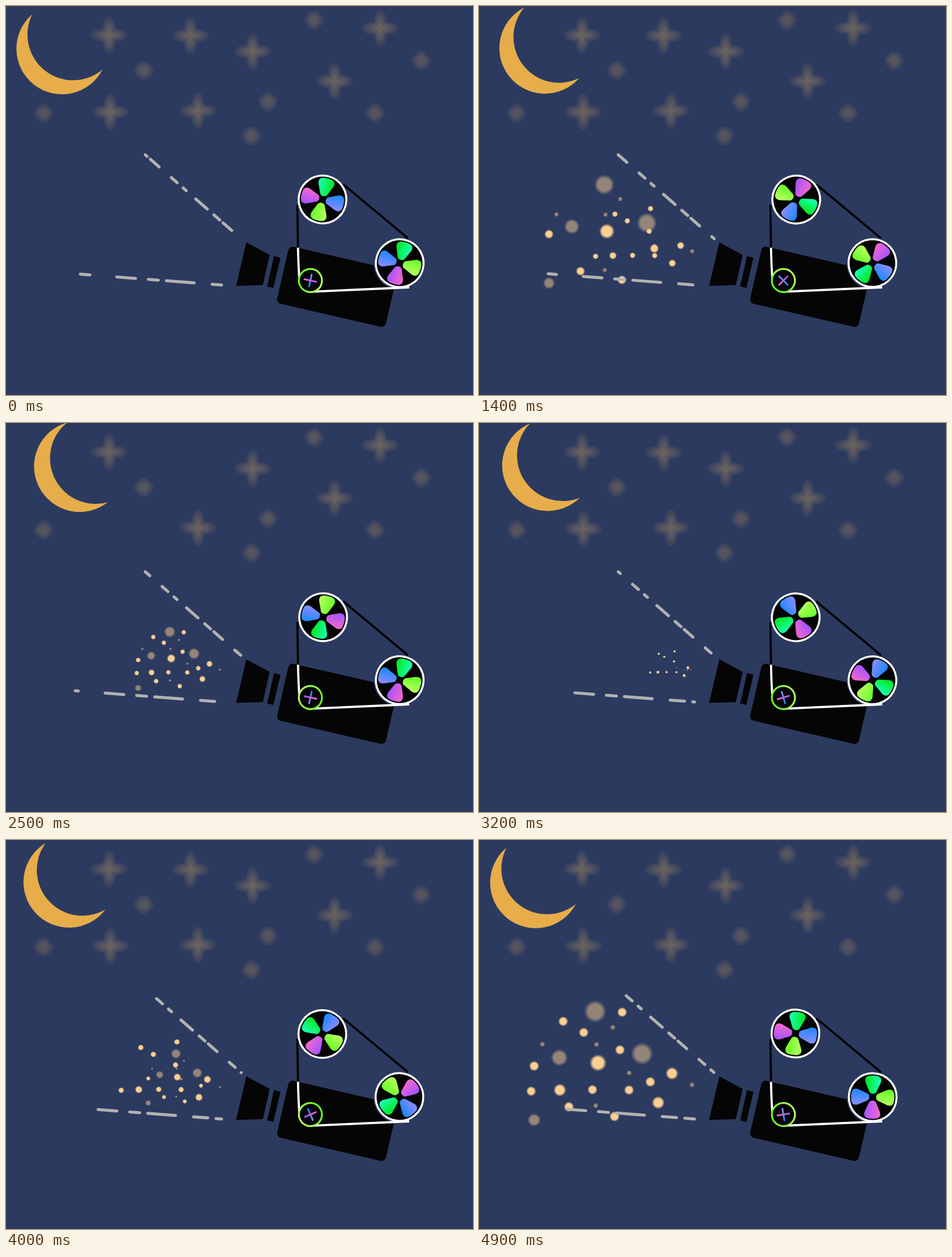
Recreate the animation shown at these times as an HTML page. Size 820 by 683 pixels, loop 5000 ms.

```html
<!DOCTYPE html>
<html lang="en">
<head>
<meta charset="utf-8">
<title>Night projector</title>
<style>
html, body { margin: 0; width: 100%; height: 100%; overflow: hidden; background: #2c3a60; }
svg { display: block; width: 820px; height: 683px; }
</style>
</head>
<body>
<svg viewBox="0 0 820 683" xmlns="http://www.w3.org/2000/svg">
  <defs>
    <linearGradient id="green"><stop stop-color="#1cffb8"/><stop offset="1" stop-color="#00e81c"/></linearGradient>
    <linearGradient id="blue"><stop stop-color="#1a88ff"/><stop offset="1" stop-color="#8c8cff"/></linearGradient>
    <linearGradient id="lime"><stop stop-color="#b8ff62"/><stop offset="1" stop-color="#66fc26"/></linearGradient>
    <linearGradient id="pink"><stop stop-color="#a452ff"/><stop offset="1" stop-color="#f268cc"/></linearGradient>
    <linearGradient id="rim" gradientUnits="userSpaceOnUse" x1="-20" x2="20"><stop stop-color="#66fc26"/><stop offset="1" stop-color="#b8ff62"/></linearGradient>
    <linearGradient id="barH" gradientUnits="userSpaceOnUse" x1="-11" x2="11"><stop stop-color="#f268cc"/><stop offset="1" stop-color="#a452ff"/></linearGradient>
    <linearGradient id="barV" gradientUnits="userSpaceOnUse" x1="0" x2="0" y1="-11" y2="11"><stop stop-color="#8c8cff"/><stop offset="1" stop-color="#1a88ff"/></linearGradient>
    <radialGradient id="glow">
      <stop offset=".62" stop-color="#fbd090"/>
      <stop offset="1" stop-color="#fbd090" stop-opacity="0"/>
    </radialGradient>
    <path id="petal" d="M-6.5-10Q-5-6 0-6Q5-6 6.5-10L13.5-26Q16-34 9-37Q0-39-9-37Q-16-34-13.5-26Z"/>
  </defs>
  <rect width="820" height="683" fill="#2c3a60"/>
  <g id="sky" fill="#e6ad5a" fill-opacity=".08"></g>
  <path id="moon" fill="#e6ad4a" d="M46 14.5A80 80 0 1 0 169.5 111.5A80.2 80.2 0 0 1 46 14.5Z"/>
  <g id="dots" fill="url(#glow)"></g>
  <g stroke="#b2b2b0" stroke-width="5.2" stroke-linecap="round">
    <path id="beamTop" d="M244.5 261.2L413 408.6" stroke-dasharray="20.4 28.5 13.8 14 7.1 22 27 15.5 13.8 7.5"/>
    <path id="beamLow" d="M121.5 470.2L378.5 489.8" stroke-dasharray="17 47.2 33.1 22.4 17.7 14.1 49.1 31.6 25.1 14.5"/>
  </g>
  <g fill="#050505">
    <path d="M422 415L463 437L451 490L404 491.5Z"/>
    <path d="M470.5 439L482 442L469.5 495L458.5 492.5Z"/>
    <rect width="196" height="102.6" rx="8" transform="translate(497.5 421) rotate(13)"/>
  </g>
  <circle cx="690.5" cy="452.5" r="44.8" fill="#2c3a60"/>
  <g fill="none" stroke-width="3.8">
    <path stroke="#050505" d="M511.6 349L512.7 424M592 313L706 408"/>
    <path stroke="#fff" d="M512.7 424.5Q513.4 455 515 478M536 501.7L708 494"/>
  </g>
  <g id="reels"></g>
  <g id="wheel" fill="none" stroke-width="3">
    <circle r="20.3" fill="#050505" stroke="url(#rim)" stroke-width="3.2"/>
    <path stroke="url(#barV)" stroke-linecap="round" d="M0-10.5V10.5"/>
    <path stroke="url(#barH)" stroke-linecap="round" d="M-10.5 0H10.5"/>
  </g>
</svg>
<script>
const LOOP = 5;
const byId = id => document.getElementById(id);

function add(parent, tag, attrs = {}) {
  const el = document.createElementNS("http://www.w3.org/2000/svg", tag);
  for (const key in attrs) el.setAttribute(key, attrs[key]);
  parent.appendChild(el);
  return el;
}

// Soft star outline: tip = reach of the arms, waist = reach of the diagonals
function outline(tip, waist) {
  const points = Array.from({ length: 64 }, (_, i) => {
    const a = i * Math.PI / 32;
    const r = waist + (tip - waist) * Math.cos(2 * a) ** 2;
    return `${(r * Math.cos(a)).toFixed(2)} ${(r * Math.sin(a)).toFixed(2)}`;
  });
  return `M${points.join("L")}Z`;
}

// The glow is a stack of shrinking outlines
const layers = (count, tip, step, waist) =>
  Array.from({ length: count }, (_, i) => outline(tip - i * step, (tip - i * step) * waist));
const BIG = layers(5, 32, 6.2, .54);
const SMALL = layers(3, 17, 4, .9);

function starGroup(big, small = []) {
  const g = add(byId("sky"), "g");
  const draw = shape => ([x, y]) => {
    const star = add(g, "g", { transform: `translate(${x} ${y})` });
    shape.forEach(d => add(star, "path", { d }));
  };
  big.forEach(draw(BIG));
  small.forEach(draw(SMALL));
  return g;
}
starGroup([[577, 132], [337, 184]]);
const starsA = starGroup(
  [[181, 51], [433, 80], [657, 39]],
  [[541, 25], [729, 96], [242, 113], [66, 188], [460, 168], [648, 188], [431, 228]]);
const starsB = starGroup([[324, 52], [183, 186]]);

// Speck kinds: radius and opacity
const KINDS = { t: [4, .5], s: [7.8, 1], m: [10, 1], l: [13, 1], M: [10, .5], L: [13, .5], X: [17, .5] };

// Spreads specks evenly along a curve that starts at a, bends toward b and ends at c
function trail(g, kinds, a, b, c) {
  [...kinds].forEach((kind, i) => {
    const u = i / (kinds.length - 1), v = 1 - u;
    const at = k => v * v * a[k] + 2 * u * v * b[k] + u * u * c[k];
    const [r, opacity] = KINDS[kind];
    add(g, "circle", { cx: at(0), cy: at(1), r: r * 1.12, opacity });
  });
}
const fastSpecks = add(byId("dots"), "g");
trail(fastSpecks, "XtX", [-88, -60], [-148, -114], [-168, -132]);
trail(fastSpecks, "slLs", [-74, -12], [-225, -78], [-272, -39]);
trail(fastSpecks, "stsM", [-135, 47], [-173, 4], [-272, 53]);
trail(fastSpecks, "ttt", [-3, -7], [-201, -110], [-258, -76]);
const slowSpecks = add(byId("dots"), "g");
trail(slowSpecks, "ssms", [-113, 2], [-214, 0], [-284, 4]);
trail(slowSpecks, "msss", [-38, -27], [-195, -97], [-228, -118]);
trail(slowSpecks, "mts", [-62, 24], [-132, -1], [-125, -134]);

// side = -1 mirrors the shading of the petals
function reel(colors, side, dx, dy) {
  const g = add(byId("reels"), "g");
  const body = add(g, "g", { transform: `translate(${dx} ${dy})` });
  add(body, "circle", { r: 41.9, fill: "#050505", stroke: "#fff", "stroke-width": 3.5 });
  colors.forEach((c, i) => add(body, "use", {
    href: "#petal", fill: `url(#${c})`, transform: `rotate(${i * 90}) scale(${side} 1)`
  }));
  return g;
}
const topReel = reel(["green", "blue", "lime", "pink"], 1, -.7, -.5);
const backReel = reel(["green", "lime", "pink", "blue"], -1, .3, 0);

// cubic-bezier(.25, .1, .25, 1)
function ease(x) {
  let lo = 0, hi = 1;
  for (let i = 0; i < 24; i++) {
    const u = (lo + hi) / 2;
    if (.75 * u * (1 - u) + u ** 3 < x) lo = u; else hi = u;
  }
  return .3 * lo * (1 - lo) ** 2 + 3 * lo * lo * (1 - lo) + lo ** 3;
}

// Shrinks to nothing and back around the moment mid
function dip(t, mid) {
  const d = (t - mid) / .35;
  if (Math.abs(d) >= 1) return 1;
  return d < 0 ? 1 - ease(1 + d) : ease(d);
}

// Rises from 0 to peak, then falls back to 0
const hill = (t, peak) => peak - Math.abs(t - peak);

const put = (el, value) => el.setAttribute("transform", value);
const spin = (el, x, y, a) => put(el, `translate(${x} ${y}) rotate(${a})`);
const spread = (el, s) => put(el, `translate(377 437) scale(${s})`);
const zoom = (el, s) => put(el, `translate(410 341.5) scale(${s}) translate(-410 -341.5)`);

function render(t) {
  put(byId("moon"), `rotate(${10 * hill(t, 2.5)} 111.3 145.5)`);
  zoom(starsA, dip(t % 4, .54));
  zoom(starsB, dip(t, 2.5));
  spread(fastSpecks, Math.min(1.03, .667 * hill(t % 3.3, 1.65)));
  spread(slowSpecks, .433 * Math.max(hill(t, 1.85), t - 2.58));
  byId("beamTop").setAttribute("stroke-dashoffset", 8.6 * t - 11.9);
  byId("beamLow").setAttribute("stroke-dashoffset", 8.2 * t - 9);
  spin(topReel, 556.3, 340.3, 13.5 + 72 * t - 3 * Math.sin(t / 2.5 * 2 * Math.PI));
  spin(backReel, 691, 451.5, 16 + 144 * t);
  spin(byId("wheel"), 534.5, 482, 12 + 216 * t);
}

const start = performance.now();
function tick() {
  render((performance.now() - start) / 1000 % LOOP);
  requestAnimationFrame(tick);
}
tick();
</script>
</body>
</html>
```
